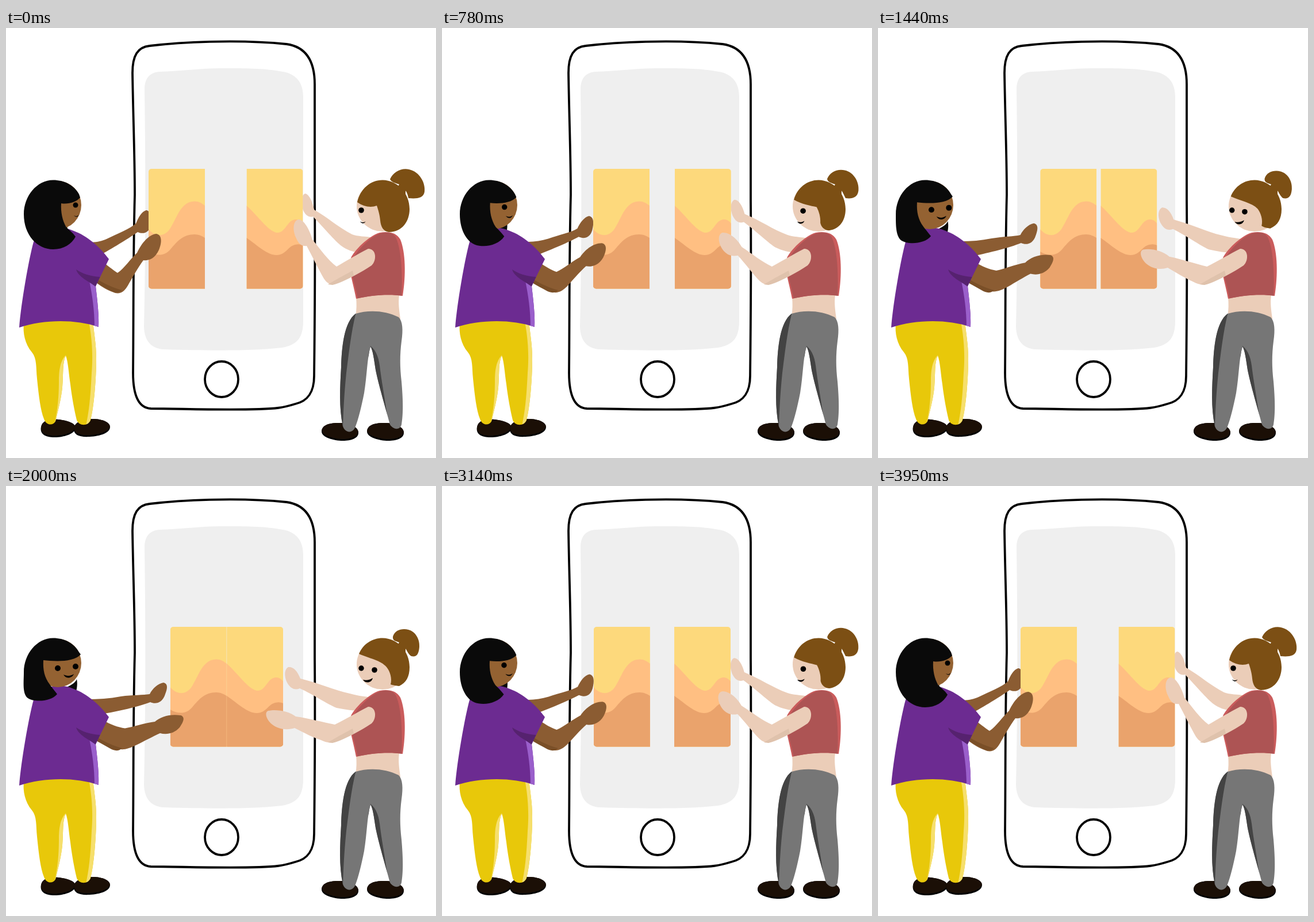
Animation of 748 by 748 pixels, one loop 4400 ms. Source, as an HTML page with a canvas:

```html
<!DOCTYPE html>
<html lang="en">
<head>
<meta charset="utf-8">
<title>Sliding a picture together</title>
<style>
  html, body { margin: 0; width: 100%; height: 100%; overflow: hidden; background: #fff; }
  canvas { display: block; width: 748px; height: 748px; }
</style>
</head>
<body>
<canvas id="stage" width="748" height="748"></canvas>
<script>
const ctx = document.getElementById('stage').getContext('2d');
const LOOP = 4400, MOVE = 1800, BACK = 2150;
const BROWN = '#8b5c32', PALE = '#ebcdb8', HAIR = '#7c4f14', INK = '#0a0a0a';

const clamp = v => Math.max(0, Math.min(1, v));
const ease = v => (1 - Math.cos(Math.PI * clamp(v))) / 2;
const lerp = (a, b, p) => a + (b - a) * p;

// Blend two path strings that share the same commands.
function mix(a, b, p) {
  const to = b.match(/-?\d+(\.\d+)?/g);
  let i = 0;
  return a.replace(/-?\d+(\.\d+)?/g, n => lerp(+n, +to[i++], p).toFixed(2));
}
function fill(d, color) {
  ctx.fillStyle = color;
  ctx.fill(new Path2D(d));
}
function line(path, width) {
  ctx.strokeStyle = '#000';
  ctx.lineWidth = width;
  ctx.stroke(path);
}
function oval(x, y, rx, ry, color) {
  ctx.beginPath();
  ctx.ellipse(x, y, rx, ry, 0, 0, Math.PI * 2);
  ctx.fillStyle = color;
  ctx.fill();
}
function eye(x, y, r) {
  if (r > 0) oval(x, y, r, r, '#000');
}
// Fill a shape, then paint shades that stay inside it.
function shaded(d, color, shades) {
  fill(d, color);
  ctx.save();
  ctx.clip(new Path2D(d));
  for (const [s, c] of shades) fill(s, c);
  ctx.restore();
}

function phone() {
  line(new Path2D('M220 78C220 48 229 33 250 31C300 25 400 19 488 28C524 33 537 60 537 98L537 300C538 420 537 520 536 605C536 634 525 649 503 654C480 661 470 662 440 663C370 665 300 662 252 662C231 661 221 640 221 600C222 500 221 400 224 290C224 220 221 150 220 78Z'), 3.8);
  fill('M241 108C241 85 252 77 268 76C300 75 340 70 375 70C420 70 445 70 475 75C505 78 517 95 517 120L517 510C517 540 505 552 480 556C440 561 370 562 275 559C255 558 241 547 240 520C243 400 243 250 241 108Z', '#efefef');
  const button = new Path2D();
  button.ellipse(375, 611, 29, 31, 0, 0, Math.PI * 2);
  line(button, 3.8);
}

function panel(x, radii, far, near) {
  ctx.save();
  ctx.translate(x, 245);
  ctx.beginPath();
  ctx.roundRect(0, 0, 98, 208.5, radii);
  ctx.clip();
  ctx.fillStyle = '#fdd97c';
  ctx.fillRect(0, 0, 98, 209);
  fill(far + 'V209H0Z', '#ffbf82');
  fill(near + 'V209H0Z', '#eaa36c');
  ctx.restore();
}
function panels(p) {
  panel(lerp(248, 285.8, p), [5, 0, 0, 5],
    'M0 105C12 119 28 119 38 103C50 84 56 57 80 56.5C87 56.5 93 60 98 64',
    'M0 144C14 152 28 152 38 140C50 126 60 114 80 114C87 114 93 117 98 120');
  panel(lerp(418.5, 384.1, p), [0, 5, 5, 0],
    'M0 64C20 82 36 107 52 111C68 113 70 88 86 88C91 88 95 91 98 95',
    'M0 120C20 134 36 150 52 150C70 150 72 132 88 131.5C92 131 95 132 98 133');
}

function backArms(p) {
  fill(mix(
    'M140 372C155 374 165 371 175 367C195 357 215 350 226 340C230 330 236 319 244 317C252 318 254 330 251 345C248 357 238 359 229 355C215 365 190 380 166 394Z',
    'M140 371C160 371 180 370 200 366C220 363 240 364 250 362C255 352 264 344 274 342C282 344 281 352 277 362C272 378 260 380 251 376C230 384 195 392 165 397Z', p), BROWN);
  fill(mix(
    'M640 365C625 362 612 363 602 359C580 348 560 330 536 316C533 300 526 288 520 288C513 292 512 304 517 317C521 326 527 330 534 328C548 342 568 366 582 378C592 386 604 390 618 391Z',
    'M640 368C620 366 608 364 598 361C570 355 545 343 512 335C507 322 500 314 491 315C484 319 484 330 488 340C494 352 502 356 511 352C535 363 560 380 575 386C590 389 605 391 618 391Z', p), PALE);
}

function shoe(d) {
  fill(d, '#000');
  ctx.save();
  ctx.clip(new Path2D(d));
  ctx.translate(0, -3);
  fill(d, '#1b0f06');
  ctx.restore();
}

function leftBody(p) {
  shoe('M61 694C63 682 78 679 92 681C108 683 121 688 121 695C121 705 104 711 88 712C72 713 58 708 61 694Z');
  shoe('M118 698C118 686 132 681 150 680C168 680 181 686 181 694C181 704 165 710 145 711C128 712 118 708 118 698Z');
  shaded('M31 514C29 530 33 550 45 564C54 575 52 590 54 610C57 640 60 665 66 680C70 692 82 692 86 684C90 668 96 645 98 625C100 600 98 582 104 570C108 580 109 600 112 620C115 645 119 665 123 682C127 693 143 693 147 682C153 660 157 610 157 575C157 550 153 530 151 510L33 508Z', '#e8c80a', [
    ['M143 505C151 545 151 575 149 600C147 640 145 665 139 692L165 690L165 505Z', '#f6df6c'],
    ['M104 569C94 580 92 595 92 615C92 640 90 665 84 690L95 690L106 600Z', '#f6df6c']]);

  fill(mix(
    'M83 352C95 348 104 342 106 336C108 345 106 354 104 362C95 358 87 354 83 352Z',
    'M100 352C112 348 121 342 123 336C125 345 123 354 121 362C112 358 104 354 100 352Z', p), INK);

  fill(mix(
    'M170 408C180 416 188 422 194 426C206 418 216 402 228 391C234 378 246 360 261 358C271 359 272 372 266 386C259 402 247 405 239 404C230 416 220 434 212 448C206 458 200 463 190 461C178 457 166 450 157 443Z',
    'M170 408C180 414 195 420 207 421.5C222 419 242 412 259 410C269 401 286 396 304 399C312 402 309 410 302 420C292 431 279 433 268 430C255 436 240 444 228 450C216 456 206 459 200 458C185 455 170 450 157 443Z', p), BROWN);
  fill('M157 443L160 438C174 446 187 452 202 456C196 462 188 461 180 456Z', '#7a4f27');

  shaded('M48 372C58 352 88 340 118 353C140 361 163 380 179 402L156 449C159 475 162 500 161 520C120 506 65 507 23 521C26 480 40 400 48 372Z', '#6c2b91', [
    ['M145 440C150 465 154 490 154 522L166 522L160 447Z', '#9a5fcb'],
    ['M122 420C132 427 146 432 164 433L156 450C145 441 126 434 122 420Z', '#56226f']]);

  oval(90, 308, 41, 42, '#946232');
  eye(121 - 31 * p, 308 + 9 * p, 4.5 + .5 * p);
  eye(121 + 24 * (1 - p), 314 - 12 * (1 - p), 5 * clamp((p - .45) / .15));
  fill(mix(
    'M118 326C121 328 124 328 126.5 325C125 329.5 121 329.5 118 326Z',
    'M100 328C106 331 112 331 118 327C115 335 104 336 100 328Z', p), '#000');
  fill(mix(
    'M127 289C118 273 101 264.5 82 264.5C54 264.5 31 292 31 324C31 360 54 385 82 385C100 385 114 376 121 363C116 356 110 351 105 347C98 335 95 320 96 305C108 307 122 303 129 295Z',
    'M127 289C118 273 101 264.5 82 264.5C54 264.5 31 292 31 324C31 340 28 362 38 369C48 376 78 376 89 362C82 353 78 348 76 345C67 333 64 320 65 303C85 305 118 307 130 293Z', p), INK);
}

function rightBody(p) {
  const step = 'M549 702C549 692 560 687 578 687C600 687 613 695 613 704C613 714 600 718 586 718C570 718 549 712 549 702Z';
  shoe(step);
  ctx.save();
  ctx.translate(79, 0);
  shoe(step);
  ctx.restore();

  fill('M609 468C630 462 665 461 684 464C682 480 684 490 686 506L608 502C610 490 610 480 609 468Z', PALE);
  shaded('M608 497C630 490 660 491 683 503C690 510 691 525 688 545C685 568 685 590 688 615C691 650 691 672 688 690C685 700 674 699 668 690C660 660 648 620 643 595C640 575 638 560 634 554C628 575 628 605 623 635C618 660 613 680 608 693C604 705 591 706 586 693C579 660 581 625 583 590C584 555 588 512 608 497Z', '#767676', [
    ['M609 494C600 530 596 570 592 600C588 640 587 665 586 698L570 690L575 494Z', '#434343'],
    ['M634 553C645 562 649 575 651 595C655 625 660 650 663 674L650 665L630 570Z', '#434343']]);

  shaded('M600 400C605 388 630 362 650 356C665 353 680 356 686 368C695 390 696 430 690 466C665 462 635 465 609 471C606 455 602 440 600 430Z', '#ca5c5c', [
    ['M602 404C612 385 635 362 652 357C664 354 674 356 678 364C688 385 690 430 688 470L612 474C608 450 604 440 602 430Z', '#ad5454']]);

  fill(mix(
    'M630 384C612 393 592 405 575 415C560 404 548 386 533 368C528 350 518 333 509 333C499 335 498 352 505 366C510 378 517 380 523 379C532 396 544 420 553 436C559 445 566 448 574 445C596 437 618 425 636 413C645 405 645 384 630 384Z',
    'M630 384C612 393 592 405 572 415C550 411 528 404 504 401C492 391 470 388 456 391C449 394 453 406 462 414C474 424 490 425 502 421C520 430 535 438 548 442C556 446 564 448 574 445C596 437 618 425 636 413C645 405 645 384 630 384Z', p), PALE);
  fill('M560 446C575 437 590 429 603 422L605 431C592 438 580 444 568 447Z', '#dfc2ac');

  oval(655, 310, 45, 44, PALE);
  eye(618 + 23 * p + 1.6 * Math.sin(2 * Math.PI * p), 317 + 3 * p, 4.8);
  eye(618 - 24 * (1 - p), 317, 4.7 * clamp((p - .66) / .15));
  fill(mix(
    'M616 336.5C618 338 622 339 625.5 336.5C623 341 618 340.5 616 336.5Z',
    'M621 337C627 339 633 337 638 334C636 343 625 344 621 337Z', p), '#000');
  fill(mix(
    'M668 263C674 250 688 243 701 246C720 250 730 270 728 285C726 297 713 297 700 296C699 290 697 285 695 283L695 294L672 284C680 278 683 274 684 272C678 270 670 268 668 263Z',
    'M673 262C676 250 690 247 700 250C712 253 720 266 719 280C718 293 714 298 705 296C700 293 698 287 695 283L695 294L672 284C680 278 683 274 684 272C678 270 672 269 673 262Z', p), HAIR);
  fill(mix(
    'M611 303C616 280 634 264.5 655 264.5C682 265 702 288 702 315C702 335 690 355 666 355C656 354 652 345 651 335C650 325 648 318 645 309C635 313 622 311 611 303Z',
    'M614 292C621 275 637 264.5 655 264.5C682 265 702 288 702 315C702 332 696 342 684 348C676 347 671 346 669 345C672 335 668 322 662 315C652 303 632 300 614 292Z', p), HAIR);
}

function draw(now) {
  const t = now % LOOP;
  const p = t < BACK ? ease(t / MOVE) : 1 - ease((t - BACK) / MOVE);
  ctx.fillStyle = '#fff';
  ctx.fillRect(0, 0, 748, 748);
  phone();
  backArms(p);
  panels(p);
  leftBody(p);
  rightBody(p);
}

const start = performance.now();
function tick() {
  draw(performance.now() - start);
  requestAnimationFrame(tick);
}
tick();
</script>
</body>
</html>
```
